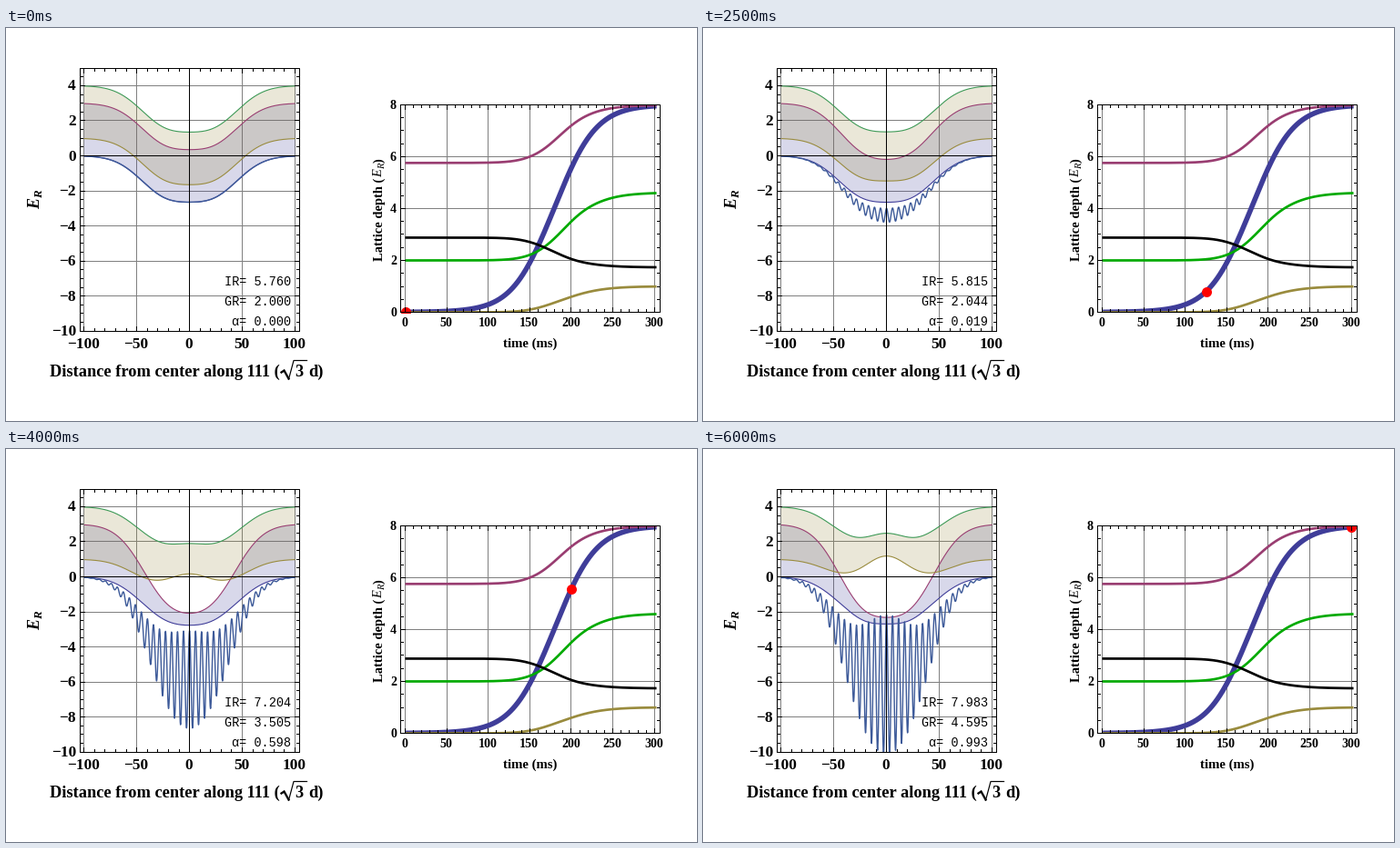
These frames come from a looping animation (759 px wide and 432 px high, 6.5 s). A matplotlib script:

```python
import numpy as np
import matplotlib.pyplot as plt
from matplotlib.animation import FuncAnimation
from matplotlib.patches import Rectangle

W, H, DPI = 759, 432, 96
PX = 72 / DPI
FRAMES, INTERVAL, STEP = 13, 500, 25
BLUE, PURPLE, YELLOW, GREEN = "#3f3d99", "#993d71", "#998b3d", "#3d9956"
WAVE, GRID = "#3d5a99", "#808080"

fig = plt.figure(figsize=(W / DPI, H / DPI), dpi=DPI, facecolor="white")
ax = fig.add_axes([0, 0, 1, 1])
ax.set_xlim(-0.5, W - 0.5)
ax.set_ylim(H - 0.5, -0.5)
ax.axis("off")


# ---- time dependence -------------------------------------------------
def ramp(lo, hi, values):
    """S-shaped curve of time through values given every 50 ms."""
    f = (np.array(values) - lo) / (hi - lo)
    knots = np.log(f / (1 - f))
    slopes = np.gradient(knots)

    def at(t):
        p = np.asarray(t, float) / 50
        i = np.clip(p.astype(int), 0, len(knots) - 2)
        u = p - i
        k = ((2 * u**3 - 3 * u**2 + 1) * knots[i] + (u**3 - 2 * u**2 + u) * slopes[i]
             + (3 * u**2 - 2 * u**3) * knots[i + 1] + (u**3 - u**2) * slopes[i + 1])
        return lo + (hi - lo) / (1 + np.exp(-k))
    return at


depth = ramp(0, 8, [0.005, 0.04, 0.30, 1.917, 5.571, 7.5973, 7.955])
infrared = ramp(5.76, 8, [5.7601, 5.761, 5.772, 6.003, 7.204, 7.878, 7.983])
compensation = ramp(2, 4.62, [2.00001, 2.0003, 2.008, 2.216, 3.505, 4.420, 4.595])


def retro(t):
    return (depth(t) / infrared(t)) ** 2


# ---- lattice physics -------------------------------------------------
X = np.linspace(-100, 100, 201)
X_FINE = np.linspace(-100, 100, 2401)


def beams(x):
    return np.exp(-4 * x**2 / 6600), np.exp(-4 * x**2 / 4790)


def levels(s, q):
    """Two lowest 1D Bloch energies, relative to the mean potential."""
    n = np.arange(-5, 6)
    hop = np.eye(11, k=1) + np.eye(11, k=-1)
    ham = np.diag((q + 2.0 * n) ** 2) - s[:, None, None] / 4 * hop
    return np.linalg.eigvalsh(ham)[:, :2].T


def bands(t):
    s0, (g, h) = depth(t), beams(X)
    s = s0 * g
    mean = -1.5 * infrared(t) * g + 3 * compensation(t) * h
    if s0 < 0.5:  # weak lattice: free particle above the minimum
        base = mean - 1.5 * s
        return base, base + 3, base + 1, base + 4
    a0, a2 = levels(s, 0)
    b1, a1 = levels(s, 1)
    return mean + 3 * a0, mean + 3 * b1, mean + a1 + 2 * a0, mean + a2 + 2 * a0


def potential(t):
    g, h = beams(X_FINE)
    mean = -1.5 * infrared(t) * g + 3 * compensation(t) * h
    return mean - depth(t) * g * (1 - 0.5 * np.cos(2 * np.pi * X_FINE / 5.7))


# ---- drawing helpers -------------------------------------------------
class Panel:
    def __init__(self, box, x0, kx, y0, ky):
        self.box = box
        self.x0, self.kx, self.y0, self.ky = x0, kx, y0, ky
        left, top, right, bottom = box
        self.clip = Rectangle((left, top), right - left, bottom - top,
                              transform=ax.transData)

    def px(self, x):
        return self.x0 + self.kx * np.asarray(x, float)

    def py(self, y):
        return self.y0 - self.ky * np.asarray(y, float)

    def line(self, x, y, color, width, z):
        art, = ax.plot(self.px(x), self.py(y), color=color, lw=width * PX, zorder=z,
                       solid_joinstyle="round", solid_capstyle="butt")
        art.set_clip_path(self.clip)
        return art

    def frame(self, xs, ys, x_major, y_major):
        """Grid, box and inward ticks; xs and ys list all tick values."""
        left, top, right, bottom = self.box
        for x in xs:
            p, big = round(float(self.px(x))), x % x_major == 0
            if big:
                rule([p, p], [top, bottom], GRID, 1)
            d = 5 if big else 3
            rule([p, p], [bottom, bottom - d])
            rule([p, p], [top, top + d])
        for y in ys:
            p, big = round(float(self.py(y))), y % y_major == 0
            if big:
                rule([left, right], [p, p], GRID, 1)
            d = 5 if big else 3
            rule([left, left + d], [p, p])
            rule([right, right - d], [p, p])
        rule([left, right, right, left, left], [top, top, bottom, bottom, top])


def rule(xs, ys, color="black", z=8, width=1):
    # whole coordinates are pixel centres, so snapping would shift the line
    ax.plot(xs, ys, color=color, lw=width * PX, zorder=z, snap=False,
            solid_capstyle="projecting", solid_joinstyle="miter")


def label(x, y, text, size, ha="left", weight="bold", style="normal",
          family="Liberation Serif", rotation=0):
    return ax.text(x, y, text, fontsize=size * PX, ha=ha, va="baseline",
                   family=family, weight=weight, style=style, zorder=9,
                   rotation=rotation, rotation_mode="anchor")


def number(v):
    return str(v).replace("-", "\u2212")


# ---- left panel: bands -----------------------------------------------
left = Panel((81, 44, 322, 333), 201.1, 1.158, 140, 19.27)
left.frame(range(-100, 101, 10), np.arange(-10, 5, 0.5), 50, 2)
rule([201, 201], [44, 333], z=7)
rule([81, 322], [140, 140], z=7)
for v in range(-100, 101, 50):
    label(left.px(v) - 0.8, 351.5, number(v), 17.3, "center")
for v in range(-10, 5, 2):
    label(76.5, left.py(v) + 5, number(v), 17.3, "right")

label(48, 382.5, "Distance from center along 111 (", 18.4)
rule([302, 305, 310], [378, 376, 385], z=9, width=2.3)
rule([310, 315.5, 330], [385.5, 365, 365], z=9, width=1.2)
label(317, 382.5, "3", 18.4)
label(332, 382.5, "d)", 18.4)
label(36.5, 198.5, "E", 18, style="italic", rotation=90)
label(39.5, 186.5, "R", 13, style="italic", rotation=90)

low_fill, = ax.fill([0, 1, 1], [0, 0, 1], color=BLUE, alpha=0.2, lw=0, zorder=2)
high_fill, = ax.fill([0, 1, 1], [0, 0, 1], color=YELLOW, alpha=0.2, lw=0, zorder=2)
edges = [left.line(X, 0 * X, c, 1.1, 4) for c in (BLUE, PURPLE, YELLOW, GREEN)]
wave = left.line(X_FINE, 0 * X_FINE, WAVE, 1.4, 5)
readouts = [label(313, y, "", 13.5, "right", "normal", family="Liberation Mono")
            for y in (282.5, 304.5, 326.5)]

# ---- right panel: ramps ----------------------------------------------
right = Panel((433, 84, 718, 312), 438, 0.9125, 312, 28.5)
right.frame(range(0, 301, 10), np.arange(0, 8, 0.5), 50, 2)
for v in range(0, 301, 50):
    label(right.px(v) - 0.7, 327.5, str(v), 14, "center")
for v in range(0, 9, 2):
    label(428.5, right.py(v) + 4.4, str(v), 14, "right")
label(574.7, 350.5, "time (ms)", 14.7, "center")
label(413, 255, "Lattice depth (", 14.5, rotation=90)
label(413, 164, "E", 14.5, weight="normal", style="italic", rotation=90)
label(416, 154.5, "R", 10.5, weight="normal", style="italic", rotation=90)
label(413, 147, ")", 14.5, rotation=90)

T = np.linspace(0, 302.5, 400)
right.line(T, depth(T), BLUE, 5.6, 3)
right.line(T, infrared(T), PURPLE, 2.7, 4)
right.line(T, retro(T), YELLOW, 2.7, 4)
right.line(T, compensation(T), "#00aa00", 2.7, 4)
right.line(T, infrared(T) / compensation(T), "black", 2.7, 4)
dot, = ax.plot([], [], "o", color="red", ms=11 * PX, mew=0, zorder=7)
dot.set_clip_path(right.clip)


def update(i):
    t = i * STEP
    curves = bands(t)
    px = left.px(X)
    for art, y in zip(edges, curves):
        art.set_ydata(left.py(y))
    ring = np.concatenate([px, px[::-1]])
    for patch, lo, hi in ((low_fill, 0, 1), (high_fill, 2, 3)):
        ys = np.concatenate([left.py(curves[lo]), left.py(curves[hi])[::-1]])
        patch.set_xy(np.column_stack([ring, ys]))
    wave.set_ydata(left.py(potential(t)))
    values = infrared(t), compensation(t), retro(t)
    for art, name, v in zip(readouts, ("IR", "GR", "\u03b1"), values):
        art.set_text(f"{name}= {v:.3f}")
    dot.set_data([right.px(t)], [right.py(depth(t))])
    return [*edges, low_fill, high_fill, wave, *readouts, dot]


anim = FuncAnimation(fig, update, frames=FRAMES, interval=INTERVAL,
                     repeat=True, repeat_delay=0, blit=False)
plt.show()
```
